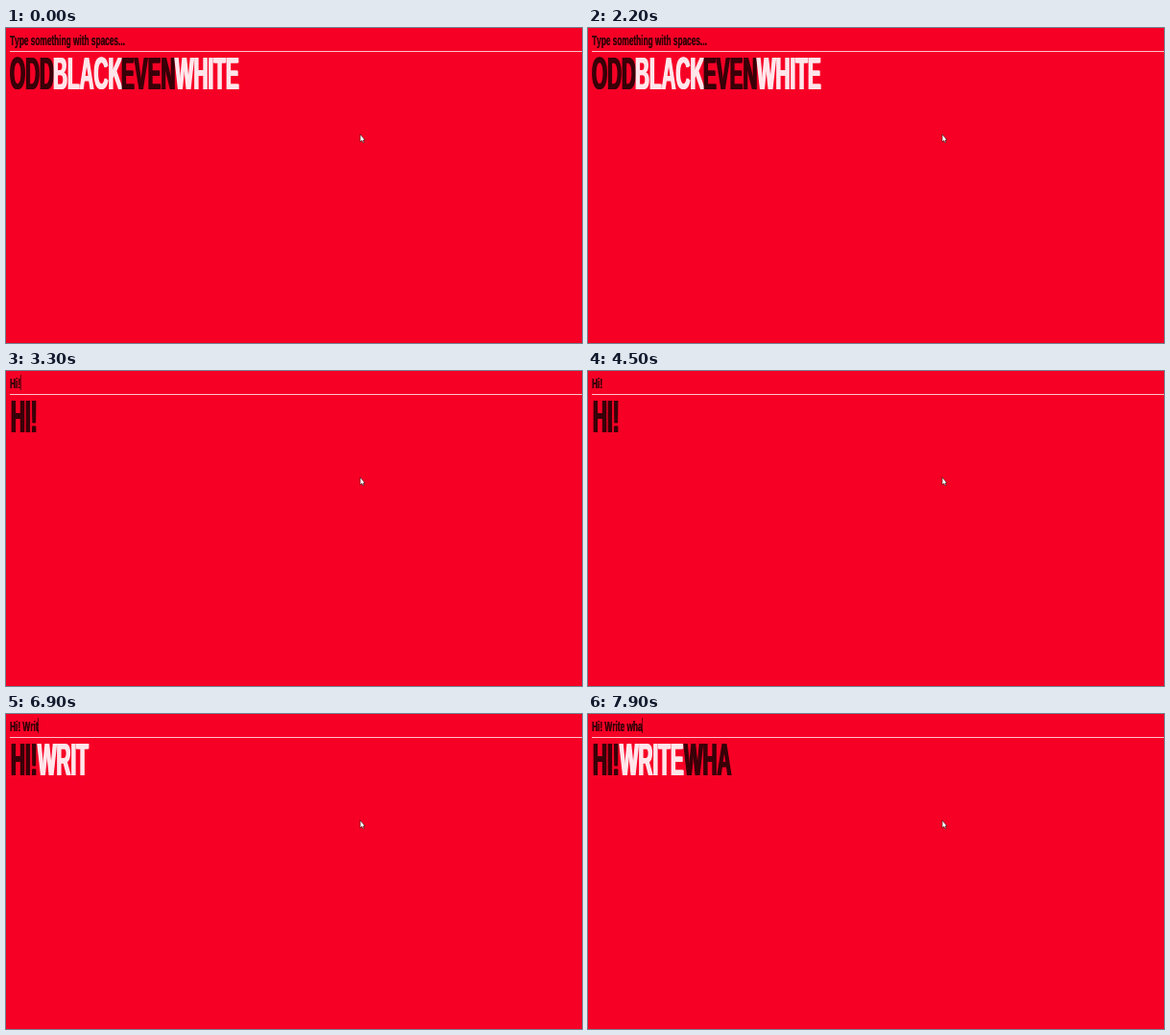
Animation, 600 px wide and 329 px high, one loop 8 s. Source, as an HTML page:

```html
<!DOCTYPE html>
<html lang="en">
<head>
<meta charset="utf-8">
<title>Odd black, even white</title>
<style>
  html, body { margin: 0; width: 100%; height: 100%; overflow: hidden; background: #f70026; }
  #stage { position: relative; width: 600px; height: 329px; overflow: hidden; }
  #stage > * { position: absolute; }
  .type {
    font-family: "Liberation Sans", Arial, sans-serif;
    font-weight: bold;
    font-kerning: none;
    line-height: 1;
    white-space: pre;
    transform-origin: 0 0;
    color: #380008;
  }
  #field {
    left: 4px; top: 5.7px;
    font-size: 14.5px;
    transform: scaleX(.572);
    text-shadow: .35px 0 currentColor;
  }
  .word {
    top: 23px;
    font-size: 48.5px;
    transform: scaleX(.427);
    text-shadow: -1.7px 0 currentColor, 1.7px 0 currentColor;
  }
  .word.even { color: #ffe6ea; }
  #rule { left: 4px; top: 24px; width: 596px; height: 1px; background: #ffc3ca; }
  #caret { top: 4px; width: 1px; height: 16px; background: rgba(0, 0, 0, .55); }
  #pointer { left: 368px; top: 110px; }
</style>
</head>
<body>
<div id="stage">
  <div id="field" class="type"></div>
  <div id="caret"></div>
  <div id="rule"></div>
  <div class="type word"></div>
  <div class="type word even"></div>
  <div class="type word"></div>
  <div class="type word even"></div>
  <svg id="pointer" width="8" height="12" viewBox="0 0 8 12">
    <path d="M1 1V9L2.8 7.5L4 10L5.1 9.5L4 7H6Z" fill="#fff" stroke="#300" stroke-width=".6"/>
  </svg>
</div>
<script>
  const LOOP = 8000, BLINK = 530;
  const field = document.getElementById("field");
  const caret = document.getElementById("caret");
  const words = [...document.querySelectorAll(".word")];

  const hint = "Type something with spaces...";
  const sample = { text: "ODD BLACK EVEN WHITE", starts: [4.4, 48.7, 120.3, 176.4] };
  const message = "Hi! Write wha";
  const messageStarts = [4.7, 32.5, 100.2];
  // One time in ms for each typed character
  const keys = [2260, 2650, 3250, 3890, 6300, 6500, 6700, 6900, 7000, 7060, 7690, 7800, 7900];

  const start = performance.now();
  let shown = null;

  function show(text) {
    if (text === shown) return;
    shown = text;
    field.textContent = text || hint;
    const parts = (text || sample.text).toUpperCase().split(" ");
    const starts = text ? messageStarts : sample.starts;
    words.forEach((word, i) => {
      word.textContent = parts[i] || "";
      word.style.left = (starts[i] || 0) + "px";
    });
    const end = text ? field.getBoundingClientRect().width : -0.5;
    caret.style.left = Math.round(4 + end - 0.5) + "px";
  }

  function draw(t) {
    const count = keys.filter(k => k <= t).length;
    show(message.slice(0, count));
    const since = t - (count ? keys[count - 1] : 60);
    const lit = since >= 0 && Math.floor(since / BLINK) % 2 === 0;
    const waiting = !count && t > 2180;
    caret.style.visibility = lit && !waiting ? "visible" : "hidden";
  }

  function tick(now) {
    draw(Math.max(0, now - start) % LOOP);
    requestAnimationFrame(tick);
  }

  draw(0);
  requestAnimationFrame(tick);
</script>
</body>
</html>
```
